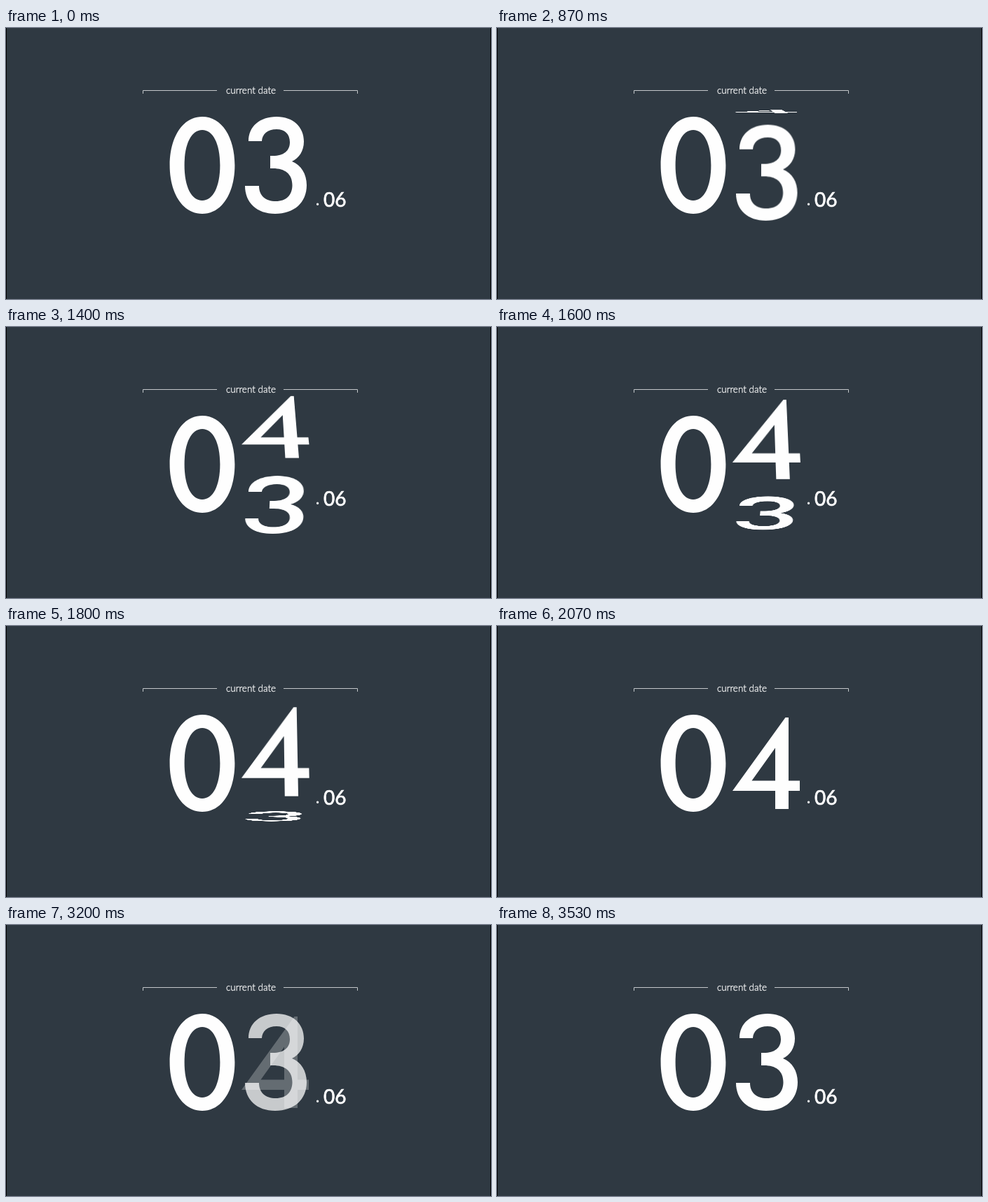
An HTML page for the animation above (3.67 s loop, 692 by 388 pixels).

```html
<!DOCTYPE html>
<html lang="en">
<head>
<meta charset="utf-8">
<title>Current date</title>
<style>
  html, body { margin: 0; width: 100%; height: 100%; overflow: hidden; background: #2f3942; }
  #stage { position: fixed; inset: 0; overflow: clip; }
  svg { position: absolute; left: 0; top: 0; width: 692px; height: 388px; fill: #fefefe; }
  text { font-family: Lato, "Open Sans", sans-serif; }
  .label { font-size: 13.5px; font-weight: 300; text-anchor: middle; stroke: #fefefe; stroke-width: .3px; }
  .dot { font-size: 26px; }
  .month { font-size: 28px; stroke: #fefefe; stroke-width: .7px; }
  /* Both digits turn around the middle of the stage: 20px, 77px inside their box. */
  .face { left: 326px; top: 117px; width: 116px; height: 160px;
    transform-origin: 20px 77px; backface-visibility: hidden; }
</style>
</head>
<body>
<div id="stage">
  <svg viewBox="0 0 692 388">
    <path fill="#000" d="M0 0h1v388h-1z M691 0h1v388h-1z"/>
    <path fill="none" stroke="#c4c8cb" d="M195.5 94V89.5H301 M396 89.5H501.5V94"/>
    <text class="label" x="349.5" y="93.5">current date</text>
    <path fill-rule="evenodd" d="M280 127C308 127 326.4 156.5 326.4 196.5S308 266 280 266S233.6 236.5 233.6 196.5S252 127 280 127Z
      M280 146C264.7 146 254.6 165.5 254.6 196.5S264.7 247 280 247S305.4 227.5 305.4 196.5S295.3 146 280 146Z"/>
    <text class="dot" x="441.6" y="254">.</text>
    <text class="month" x="453" y="255.5">06</text>
  </svg>
  <svg class="face" id="three" viewBox="326 117 116 160">
    <path d="M346 162C346 141 362 127 386 127C410 127 425 142 425 162.5C425 176 418 186.5 408 191
      C421 196 429 209 429 225C429 250 411 266 384 266C358 266 341 250 341 226H361
      C361 240 370 248 385 248C400 248 408.5 239 408.5 225C408.5 209 398 201 381 201H377V183H381
      C396 183 405 176 405 163.5C405 152 398 145 386 145C373 145 365.5 152 365 162Z"/>
  </svg>
  <svg class="face" id="four" viewBox="326 117 116 160">
    <path fill-rule="evenodd" d="M411.5 131H416V221.5H432V236H416V262H397V236H336Z M397 174.5L363.5 221.5H397Z"/>
  </svg>
</div>
<script>
  const LOOP = 3670, FPS = 15, RADIUS = 85;
  const three = document.getElementById('three');
  const four = document.getElementById('four');

  const clamp = v => Math.min(1, Math.max(0, v));
  const smooth = v => v * v * (3 - 2 * v);

  // Short ease at both ends, nearly steady speed between.
  function ease(x, pull = 0.2) {
    let lo = 0, hi = 1;
    for (let i = 0; i < 24; i++) {
      const s = (lo + hi) / 2, r = 1 - s;
      const at = 3 * r * r * s * pull + 3 * r * s * s * (1 - pull) + s ** 3;
      if (at < x) lo = s; else hi = s;
    }
    return smooth(hi);
  }

  // Places a digit on the side of a rolling box.
  function pose(face, angle, opacity) {
    face.style.transform = `perspective(800px) translate3d(0, 2.5px, ${-RADIUS}px) ` +
      `rotateX(${angle}deg) translate3d(0, -2.5px, ${RADIUS}px)`;
    face.style.opacity = opacity;
  }

  function draw(now) {
    const step = Math.floor((now % LOOP + 4) * FPS / 1000);
    const turn = 90 * ease(clamp((step - 10) / 21));
    const fade = smooth(clamp((step - 44) / 6));
    pose(three, fade ? 0 : -turn, fade || 1);
    pose(four, 90 - turn, 1 - fade);
  }

  const start = performance.now();
  function tick() {
    draw(performance.now() - start);
    requestAnimationFrame(tick);
  }
  tick();
</script>
</body>
</html>
```
